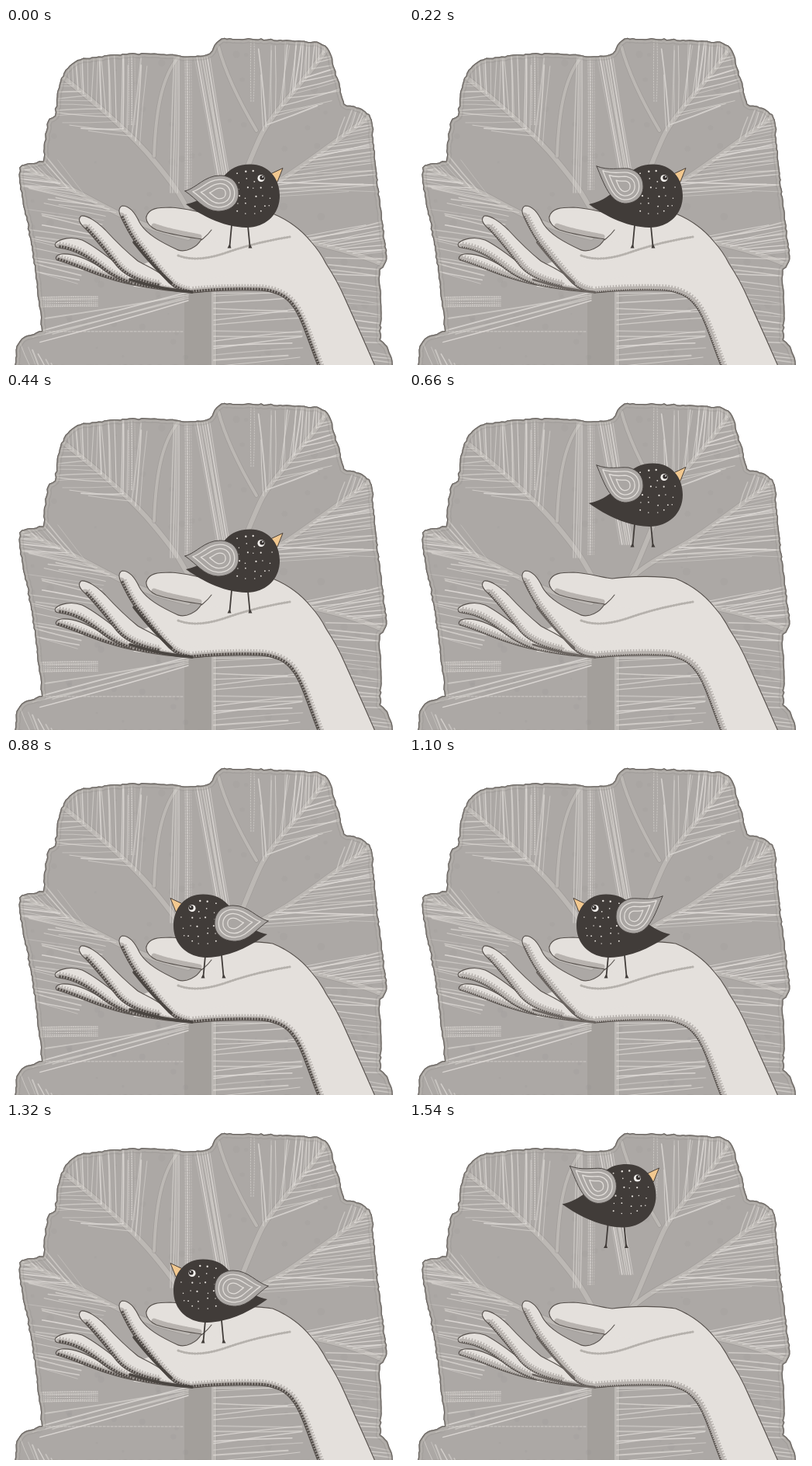
An HTML page for the animation above (1.76 s loop, 512 by 434 pixels).

```html
<!DOCTYPE html>
<html lang="en">
<head>
<meta charset="utf-8">
<title>Bird on a hand</title>
<style>
html, body { margin: 0; width: 100%; height: 100%; overflow: hidden; background: #fff; }
svg { display: block; width: 100%; height: 100%; }
path { fill: none; stroke-linecap: round; stroke-linejoin: round; }
.skin { fill: #e4e0dc; }
.edge { stroke: #57514d; stroke-width: 1.1; }
.tone { stroke: #b8b3af; stroke-width: 11; }
.teeth { stroke: #b8b3af; stroke-width: 16; stroke-dasharray: 1.6 2.1; stroke-linecap: butt; }
.ink { stroke: #57514d; stroke-width: 4; stroke-dasharray: 1.2 1.6; stroke-linecap: butt; }
.heavy .ink { stroke-width: 7; stroke-dasharray: 2.6 1; }
.crease { stroke: #6b6561; stroke-width: 2.4; }
.heavy .crease { stroke: #4a4541; stroke-width: 3.6; }
.body { fill: #413c39; }
.wing { fill: #aaa6a3; stroke: #4a4542; }
.ring { stroke: #e2deda; stroke-width: 1.3; vector-effect: non-scaling-stroke; }
</style>
</head>
<body>
<svg viewBox="0 0 512 434">
  <g id="paper"></g>
  <g id="hand" transform="translate(0 3)"></g>
  <g id="bird"></g>
</svg>
<script>
const part = id => document.getElementById(id);
const times = (n, make) => Array.from({ length: n }, (_, i) => make(i)).join('');
const fix = n => n.toFixed(1);

let seed = 7;
const rand = () => (seed = (seed * 16807) % 2147483647) / 2147483647;
const jitter = a => (rand() * 2 - 1) * a;

const stroke = (d, color, width, extra = '') =>
  `<path d="${d}" stroke="${color}" stroke-width="${width}" ${extra}/>`;

function curve(d) {
  const p = document.createElementNS('http://www.w3.org/2000/svg', 'path');
  p.setAttribute('d', d);
  const length = p.getTotalLength();
  return { length, at: t => p.getPointAtLength(t * length) };
}

// ---- torn sheet with leaf veins
const SHEET = 'M75,58Q82,44 96,40Q170,27 238,37Q264,36 269,24Q272,13 284,13Q350,14 400,18Q414,20 419,34' +
  'L437,99Q470,102 473,122Q474,170 491,290Q492,306 482,311L484,372 483,402Q498,410 499,440' +
  'H12Q10,402 24,398L46,390Q38,300 22,225Q14,185 19,177L48,171Q50,130 55,118L63,112Q66,75 75,58Z';

function torn(d) {
  const c = curve(d), n = Math.round(c.length / 4);
  return 'M' + times(n, i => {
    const p = c.at(i / n);
    return `${fix(p.x + jitter(0.9))},${fix(p.y + jitter(0.9))} `;
  }) + 'Z';
}

const scratch = (x, y, u, v, dash = 'none') =>
  stroke(`M${fix(x)},${fix(y)}Q${fix((x + u) / 2 + jitter(2))},${fix((y + v) / 2 + jitter(2))} ${fix(u)},${fix(v)}`,
    '#dedad6', fix(0.6 + rand() * 1.3), `opacity="${fix(0.5 + rand() * 0.4)}" stroke-dasharray="${dash}"`);

// pale ribs leaving one side of a vein at an angle to its direction
function ribs(d, n, from, turn, reach) {
  const c = curve(d);
  return times(n, i => {
    const t = from + (1 - from) * (i + rand() * 0.7) / n;
    const p = c.at(t), q = c.at(t - 0.02);
    const a = Math.atan2(p.y - q.y, p.x - q.x) + (turn + jitter(5)) * Math.PI / 180;
    const len = reach * (0.75 + rand() * 0.35);
    return scratch(p.x, p.y, p.x + Math.cos(a) * len, p.y + Math.sin(a) * len);
  });
}

const vein = (d, w) => stroke(d, '#8f8b87', w + 1.5, 'opacity=".4"') + stroke(d, '#bcb8b4', w);

function leaf() {
  const upLeft = 'M238,240C222,210 215,200 190,170S120,100 72,62';
  const upRight = 'M285,240C302,205 314,170 328,140S385,70 414,26';
  const right = 'M285,240C305,220 335,206 355,195S430,142 472,112';
  const lowRight = 'M300,262C380,270 440,284 490,306';
  const left = 'M235,270C200,262 190,258 160,246S70,196 18,178';
  const trunk = 'M268,338V440';
  return [upLeft, upRight, right, lowRight, left, trunk].map(d => vein(d, 6)).join('') +
    vein('M222,38C200,64 193,110 191,165', 4) + vein('M274,24C284,62 304,100 323,132', 4) +
    ribs(upLeft, 20, 0.45, 48, 105) + ribs(upLeft, 14, 0.5, -42, 70) +
    ribs(upRight, 20, 0.45, -34, 95) + ribs(upRight, 13, 0.5, 38, 75) +
    ribs(right, 9, 0.75, -35, 35) + ribs(right, 26, 0.15, 27, 150) +
    ribs(lowRight, 16, 0.35, -21, 110) +
    ribs(left, 16, 0.4, -20, 90) + ribs(left, 8, 0.6, 22, 70) +
    ribs('M130,238L90,335', 15, 0, 80, 95) +
    ribs('M235,340V352', 5, 0, 79, 190) + ribs(trunk, 15, 0, -93, 120) +
    ribs('M412,295L470,440', 20, 0, -62, 80) + ribs('M16,402L70,440', 7, 0, 30, 35) +
    times(7, i => scratch(243 + i * 3.3, 38, 272 + i * 2.8, 195)) +
    times(4, i => scratch(217 + i * 2, 38, 212 + i * 3, 212)) +
    times(4, i => scratch(231 + i * 2.5, 38, 231 + i * 2.5, 208, '2 1.6')) +
    times(3, i => scratch(158 + i * 4, 36, 158 + i * 4, 125, '1.5 1.5')) +
    times(2, i => scratch(316 + i * 4, 16, 316 + i * 3, 96, '1.5 2')) +
    times(6, i => scratch(45, 347 + i * 2.4, 118, 346 + i * 2.4, '1 1.8')) +
    scratch(50, 391, 230, 391, '3 2');
}

function paper() {
  const d = torn(SHEET);
  const specks = times(120, () =>
    `<circle cx="${fix(20 + rand() * 460)}" cy="${fix(20 + rand() * 410)}" r="${fix(1 + rand() * 4)}" fill="#8d8986" opacity=".1"/>`);
  part('paper').innerHTML =
    `<clipPath id="sheet"><path d="${d}"/></clipPath><g clip-path="url(#sheet)">` +
    '<rect width="512" height="434" fill="#aca8a5"/><rect x="230" y="338" width="34" height="96" fill="#a39f9b"/>' +
    specks + leaf() +
    stroke(d, '#8b8784', 12, 'opacity=".25"') + stroke(d, '#d0ccc8', 9, 'opacity=".3" stroke-dasharray="5 4"') +
    stroke(d, '#7b7672', 4, 'opacity=".5"') + stroke(d, '#6a6561', 2) + '</g>';
}

// ---- hand
let clips = 0;
function shaded(fill, under) {
  const id = 'skin' + clips++;
  return `<clipPath id="${id}"><path d="${fill}"/></clipPath><path class="skin" d="${fill}"/>` +
    `<g clip-path="url(#${id})">` + ['tone', 'teeth', 'ink'].map(c => `<path class="${c}" d="${under}"/>`).join('') + '</g>';
}
const edge = d => `<path class="edge" d="${d}"/>`;
const limb = (top, tip, under) => shaded(top + tip + under, 'M' + tip + under) + edge(top + tip + under);

function hand() {
  const back = 'M181,240C184,229 196,228 212,228C232,229 246,234 262,236C290,232 325,233 344,236' +
    'C366,245 382,258 394,273Q405,285 413,301Q427,322 437,345L459,394 478,437';
  const arm = 'M404,437C390,402 382,372 370,356C360,341 342,335 322,335Q280,334 240,338';
  const thumb = 'M252,269C240,267 212,263 194,257C185,253 180,246 181,240';
  const crook = 'M222,283C232,286 246,280 252,269';
  const join = d => 'L' + d.slice(1);
  part('hand').innerHTML =
    shaded(`${back}${join(arm)}L165,330 150,312 185,298${join(crook)}${join(thumb)}Z`, arm) +
    stroke('M191,252C210,259 230,262 249,266', '#b8b3af', 7, 'stroke-dasharray="2 .8"') +
    [back, arm, thumb].map(edge).join('') +
    limb('M120,304C102,293 86,287 72,288C64,289 63,294 ', '66,296', 'C90,303 105,311 130,319C160,329 200,335 240,338') +
    limb('M150,306C130,291 115,278 98,270C85,265 70,268 64,274C62,277 64,280 ', '68,280',
      'C92,283 108,295 125,308C138,318 150,323 165,328') +
    limb('M206,318C190,306 178,302 170,297C155,285 140,270 128,257C118,247 105,238 97,239C92,243 95,249 ', '102,255',
      'C115,268 128,285 140,300C150,314 166,323 198,330') +
    limb('M222,283C200,273 180,262 172,247C166,234 158,226 150,226C145,228 145,234 ', '148,240',
      'C155,255 160,265 168,275C180,290 195,310 210,325C218,333 228,337 240,338') +
    '<path class="skin" d="M214,282C228,287 245,281 252,270L290,275V315L238,325Z"/>' +
    '<path class="crease" d="M165,273C180,292 198,312 213,325M160,321Q200,334 240,337"/>' + edge(crook) +
    stroke('M222,290C240,297 262,294 285,286S335,271 366,266', '#aaa5a1', 3, 'stroke-dasharray="1.2 2.4" opacity=".8"') +
    edge('M252,270Q260,264 265,257');
}

// ---- bird
function wing(id, d, x, y) {
  const rings = [0.78, 0.55, 0.3].map(s =>
    `<path class="ring" d="${d}" transform="translate(${x} ${y}) scale(${s}) translate(${-x} ${-y})"/>`).join('');
  return `<g id="${id}"><path class="wing" d="${d}"/>${rings}</g>`;
}

function speckles() {
  return times(36, i => {
    const x = 287 + (i % 6) * 11 + jitter(3), y = 186 + Math.floor(i / 6) * 10.5 + jitter(3);
    const inside = Math.hypot(x - 316, y - 213) < 32 && Math.hypot(x - 329, y - 193) > 8;
    return inside ? `<circle cx="${fix(x)}" cy="${fix(y)}" r="${fix(0.7 + rand() * 0.5)}" fill="#e6e1dc"/>` : '';
  });
}

function bird() {
  part('bird').innerHTML =
    stroke('M291,254L288.5,281M312,255L314.5,281', '#413c39', 1.8) +
    '<path class="body" d="M288.5,278L285.5,283.5H290.5ZM314.5,278L312.5,283.5H317.5Z"/>' +
    '<path d="M339,189L357,180.5 350,198Z" stroke="#4a4038" style="fill:#f2c88f"/>' +
    '<path class="body" d="M232,227C255,222 270,207 278,195C288,180 300,175.5 315,175.5C338,175.5 353,193 353,216' +
    'C353,240 335,257 310,257C280,256 255,243 232,227Z"/>' + speckles() +
    '<circle cx="329" cy="193.5" r="4.6" fill="#f3f0ed"/><circle cx="330.2" cy="192.7" r="2.9" fill="#332e2c"/>' +
    '<circle cx="331" cy="191.7" r=".9" fill="#fff"/>' +
    wing('down', 'M231,210C246,206 256,190 276,190C292,190 300,201 300,213C300,227 289,236 273,236C255,235 246,220 231,210Z', 276, 213) +
    wing('up', 'M242,178C258,184 270,180 283,181C296,184 302,193 302,204C302,218 291,226 278,226C259,224 252,202 242,178Z', 278, 204);
}

// ---- timing: wings flap every other step, every fourth step is a hop
const STEP = 220, COUNT = 8;
const LEFT = 'translate(569 0) scale(-1 1)';

function draw(ms) {
  const i = Math.floor(ms / STEP) % COUNT;
  const flap = i % 2 === 1, hop = i % 4 === 3, second = i >= 4;
  const pose = hop ? (second ? 'translate(-34.5 -122.5)' : 'translate(0 -85)') : (second ? LEFT : '');
  part('bird').setAttribute('transform', pose);
  part('up').style.display = flap ? '' : 'none';
  part('down').style.display = flap ? 'none' : '';
  part('hand').setAttribute('class', flap ? '' : 'heavy');
}

paper();
hand();
bird();
const start = performance.now();
function tick() {
  draw(performance.now() - start);
  requestAnimationFrame(tick);
}
tick();
</script>
</body>
</html>
```
